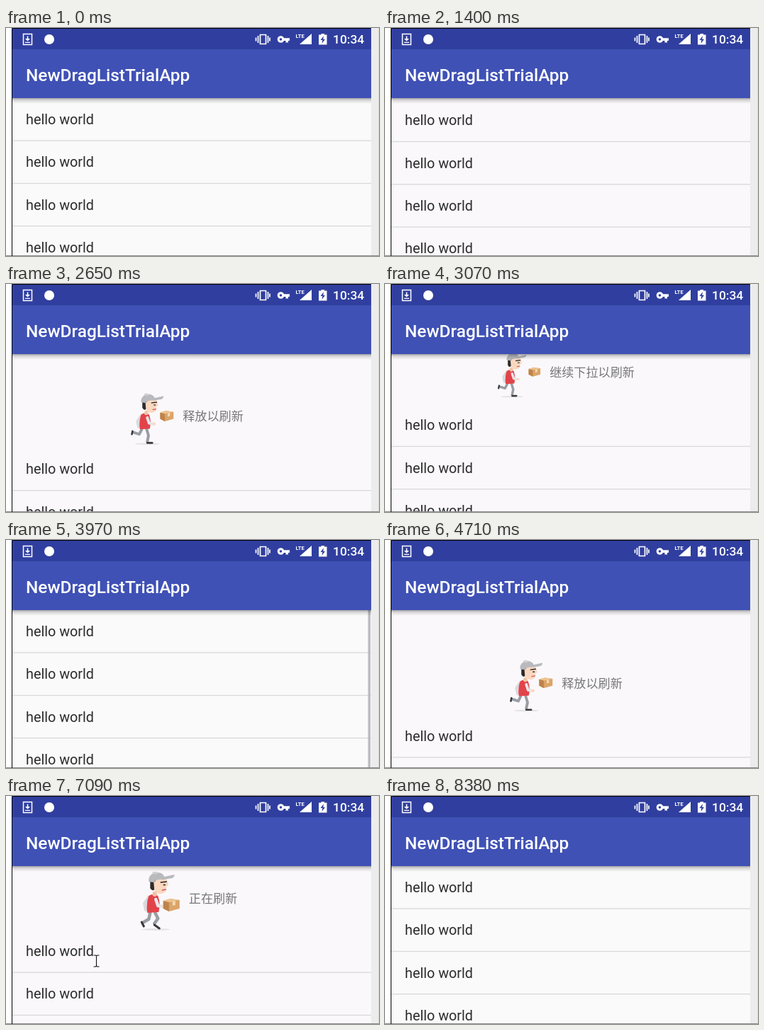
Animation of 526x322 px, one loop 8750 ms. Source, as an HTML page:

```html
<!DOCTYPE html>
<html lang="zh-CN">
<head>
<meta charset="utf-8">
<style>
html, body { margin: 0; width: 100%; height: 100%; overflow: hidden; background: #fff; }
svg { display: block; font-family: Roboto, sans-serif; }
.line { fill: none; stroke-width: 4.5; stroke-linejoin: round; stroke-linecap: round; }
#label { font: 17.1px "Noto Sans CJK SC", "Noto Sans CJK", sans-serif; fill: #777; text-anchor: middle; }
</style>
</head>
<body>
<svg width="526" height="322" viewBox="0 0 526 322">
  <defs>
    <clipPath id="view"><rect x="9" y="99" width="506" height="222"/></clipPath>
    <linearGradient id="shade" x2="0" y2="1">
      <stop stop-color="#000" stop-opacity=".34"/>
      <stop offset=".4" stop-color="#000" stop-opacity=".13"/>
      <stop offset="1" stop-color="#000" stop-opacity="0"/>
    </linearGradient>
  </defs>

  <rect id="page" x="9" y="99" width="506" height="222"/>
  <g clip-path="url(#view)">
    <g id="list">
      <g id="header">
        <text id="label" x="292" y="151"/>
        <!-- courier: origin at left edge, vertical middle -->
        <g id="person"><g transform="translate(-184 -148)">
          <ellipse cx="211" cy="188.5" rx="20" ry="1.5" fill="#e4e3e5"/>
          <path class="line" d="M201 143L195 152L197 161" stroke="#d9dadd"/>
          <g id="legs"></g>
          <path d="M201 141Q208 136 214 141Q218 152 215 164L199 165Q197 152 201 141Z" fill="#e2434a"/>
          <path d="M206 140Q209 144 213 140L212 135H207Z" fill="#f0c3a6"/>
          <path d="M203 118V130Q206 136 210 131L211 119Z" fill="#2d2b2c"/>
          <path d="M208 122Q214 116 226 117L229 126L226 128L225 135Q217 142 209 134Z" fill="#fad8c0"/>
          <path d="M218 122L226 121M222 125.5H224" class="line" style="stroke-width:1.6" stroke="#222"/>
          <path d="M220 133L225 132" class="line" style="stroke-width:1.4" stroke="#d0565a"/>
          <path d="M201 121C200 113 206 108 213 108C219 108 222 111 223 114L237 111Q238 114 234 116L222 118Q212 117 208 122Z" fill="#b8babe"/>
          <ellipse cx="210" cy="108.5" rx="4" ry="1.8" fill="#cfd0d3"/>
          <path class="line" d="M211 146L214 155L220 156" stroke="#e6e6e8"/>
          <circle cx="222" cy="156" r="2.5" fill="#fad8c0"/>
        </g></g>
        <!-- parcel: origin at right edge, vertical middle -->
        <g id="parcel">
          <path d="M-23 -6L-13 -9L0 -7V5L-15 9L-23 5Z" fill="#dca468"/>
          <path d="M-23 -6L-15 -4V9L-23 5Z" fill="#bd834c"/>
          <path d="M-23 -6L-13 -9L0 -7L-15 -4Z" fill="#edc48f"/>
          <path d="M-10 -5L-6 -5.8V0L-10 1Z" fill="#f2d9b4"/>
        </g>
      </g>
      <g id="rows" transform="translate(0 90)" font-size="19.8" fill="#2c2c2c"></g>
    </g>
    <rect id="scrollbar" x="510.5" y="99" width="3.5" height="222" fill="#bdbcc2"/>
  </g>

  <rect x="9" y="99" width="506" height="8" fill="url(#shade)"/>
  <rect x="9" y="30" width="506" height="69" fill="#3f51b5"/>
  <rect x="9" width="506" height="30" fill="#303f9f"/>
  <text x="28" y="74.5" font-size="24.4" font-weight="500" fill="#fff">NewDragListTrialApp</text>

  <g fill="#fff">
    <path d="M24.5 8.5H36.5V23.5H24.5Z" fill="none" stroke="#fff" stroke-width="1.5"/>
    <path d="M29.7 11.5H31.3V15H34L30.5 18.5L27 15H29.7ZM27 19.7H34V21H27Z"/>
    <circle cx="61" cy="16" r="7"/>
    <path d="M358.5 9.5H366.5V22.5H358.5ZM355.5 11V21M352.5 13.5V18.5M369.5 11V21M372 13.5V18.5" fill="none" stroke="#fff" stroke-width="1.7"/>
    <path d="M390 14.3H400V18H398V20.5H394.5V18H390Z"/>
    <circle cx="387.5" cy="16" r="3.3" fill="none" stroke="#fff" stroke-width="3"/>
    <path d="M431 8V23H414Z"/>
    <text x="408.5" y="13.5" font-size="7.5" font-weight="700" stroke="#303f9f" stroke-width="1.5" paint-order="stroke">LTE</text>
    <path d="M441 9.5H444.5V8H449V9.5H452.5V23.5H441Z"/>
    <path d="M448 11L443.5 17H446.3L445.5 22L450 15.7H447.2Z" fill="#303f9f"/>
    <text x="461" y="22.2" font-size="17.4" font-weight="500">10:34</text>
  </g>

  <rect x="515" width="11" height="322" fill="#ececec"/>
  <path d="M525.5 0V322" stroke="#dedede"/>
  <path d="M0 321.5H526" stroke="#8a8a8a"/>
  <path d="M8.5 322V.5H515" fill="none" stroke="#000"/>
  <path id="cursor" d="M-4 -8H-1L0 -7L1 -8H4M0 -7V7M-4 8H-1L0 7L1 8H4" fill="none" stroke="#111" stroke-width="1.1"/>
</svg>
<script>
const LOOP = 8750, RELEASE = 5000, HEADER = 90;
const $ = id => document.getElementById(id);
const smooth = u => u * u * (3 - 2 * u);
const easeOut = u => 1 - (1 - u) ** 3;

// [time, list offset, easing towards it]
const pull = [
  [1360, 0], [2150, 170, smooth], [3800, 0, smooth],
  [4030, 0, smooth], [4850, 160, smooth], [RELEASE, 160, smooth],
  [5420, HEADER, easeOut], [7650, HEADER, smooth], [8250, 0, smooth]
];
// y of the pointer while it is shown
const pointer = [[6700, 300], [7030, 233, smooth]];
// opacity of the scroll bar after the list comes back to its top
const scrollFade = [[3750, 0], [3850, 1, smooth], [4050, 1, smooth], [4300, 0, smooth]];

function track(keys, t) {
  const i = keys.findIndex(k => k[0] > t);
  if (i < 0) return keys.at(-1)[1];
  if (i === 0) return keys[0][1];
  const [t0, a] = keys[i - 1], [t1, b, ease] = keys[i];
  return a + (b - a) * ease((t - t0) / (t1 - t0));
}

const leg = (bone, shoe) =>
  `<path class="line" d="M${bone}" stroke="#999da4"/>
   <path class="line" d="M${shoe}" stroke="#38383c" style="stroke-width:3"/>`;
const strides = [
  leg("202 165L198 173L189 170", "187 168L186 173") + leg("210 165L213 175L211 185", "211 187L219 187"),
  leg("203 165L201 174L194 178", "191 178L194 184") + leg("210 165L214 173L209 180", "209 182L216 187"),
  leg("203 165L205 175L199 182", "197 183L201 187") + leg("210 165L217 172L217 181", "217 183L223 182")
];

$("rows").innerHTML = Array.from({ length: 4 }, (_, i) => {
  const y = i * 60.3;
  return `<text x="28" y="${136 + y}">hello world</text>
    <rect x="9" y="${158.5 + y}" width="506" height="1.3" fill="#d9d9d9"/>`;
}).join("");

let stride = -1;
function draw(now) {
  const t = now % LOOP;
  const offset = track(pull, t);
  const busy = t >= RELEASE;
  const label = busy ? "正在刷新" : offset > HEADER ? "释放以刷新" : "继续下拉以刷新";
  const size = Math.min(1, offset / 80);
  const left = 292 - label.length * 17.1 / 2 - 73.5;

  $("page").setAttribute("fill", offset > 0 ? "#faf8fb" : "#fafafa");
  $("list").setAttribute("transform", `translate(0 ${offset - HEADER})`);
  $("header").style.display = offset > 0 ? "" : "none";
  if ($("label").textContent !== label) $("label").textContent = label;
  $("person").setAttribute("transform", `translate(${left} 148) scale(${busy ? 1 : 0.87 * size})`);
  $("parcel").setAttribute("transform",
    `translate(${left + 60.5} ${busy ? 154 : 144}) scale(${busy ? 1 : 0.82 * size})`);

  const next = busy ? (Math.floor((t - RELEASE + 10) / 60) + 2) % 3 : 0;
  if (next !== stride) $("legs").innerHTML = strides[stride = next];

  $("scrollbar").setAttribute("opacity", track(scrollFade, t));
  $("cursor").style.display = t >= 6700 && t < 7400 ? "" : "none";
  const y = track(pointer, t);
  $("cursor").setAttribute("transform", `translate(${127.5 - (y - 233) / 6} ${y})`);
  requestAnimationFrame(() => draw(performance.now()));
}
draw(0);
</script>
</body>
</html>
```
